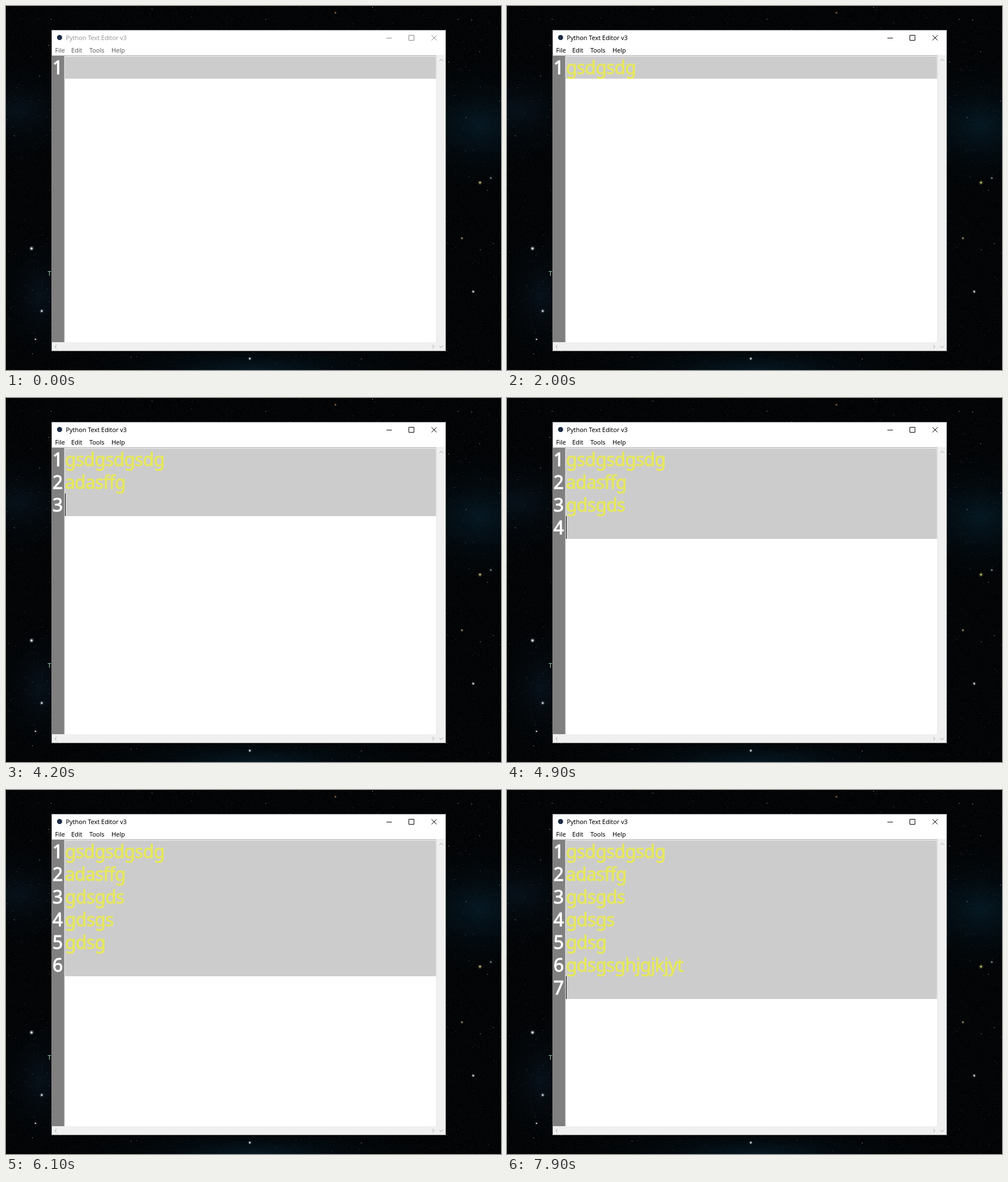
Recreate the animation shown at these times as an HTML page. Size 873 by 641 pixels, loop 8000 ms.

```html
<!DOCTYPE html>
<html lang="en">
<head>
<meta charset="utf-8">
<title>Text editor</title>
<style>
  html, body { margin: 0; width: 100%; height: 100%; overflow: hidden; background: #020406; }
  svg { display: block; width: 100%; height: 100%; }
  text { white-space: pre; font-family: "Noto Sans", "Open Sans", sans-serif; }
  .ui text { font-size: 11px; letter-spacing: -.08px; }
  .code text {
    font-size: 32px; letter-spacing: -.85px; stroke-width: 1;
    font-kerning: none; font-variant-ligatures: none;
  }
  .line { fill: none; stroke-width: 1; }
</style>
</head>
<body>
<svg viewBox="0 0 873 641" xmlns="http://www.w3.org/2000/svg">
  <defs>
    <radialGradient id="teal"><stop offset="0" stop-color="#051823"/><stop offset="1" stop-color="#020406" stop-opacity="0"/></radialGradient>
    <radialGradient id="blue"><stop offset="0" stop-color="#07111a"/><stop offset="1" stop-color="#020406" stop-opacity="0"/></radialGradient>
  </defs>

  <rect width="873" height="641" fill="#020406"/>
  <ellipse cx="835" cy="210" rx="170" ry="120" fill="url(#teal)"/>
  <ellipse cx="20" cy="185" rx="150" ry="95" fill="url(#blue)"/>
  <ellipse cx="60" cy="510" rx="80" ry="120" fill="url(#blue)"/>
  <ellipse cx="440" cy="640" rx="330" ry="50" fill="url(#teal)"/>
  <g id="sky"></g>
  <text x="73.5" y="474.5" font-size="11" fill="#a4d8b0">T</text>

  <!-- window -->
  <rect x="80.5" y="42.5" width="695" height="565" fill="#fff" stroke="#777"/>
  <circle cx="94.5" cy="55.5" r="4.5" fill="#1c2d45"/>
  <g class="ui" id="labels">
    <text x="105.5" y="60">Python Text Editor v3</text>
    <g id="menu">
      <text x="86.5" y="82">File</text>
      <text x="115" y="82">Edit</text>
      <text x="147" y="82">Tools</text>
      <text x="186" y="82">Help</text>
    </g>
  </g>
  <path id="controls" class="line" d="M671 56.5h9.5M710.5 51.5h9v9h-9zM750.5 51.5l9 9M759.5 51.5l-9 9"/>

  <!-- scroll bars -->
  <path d="M760 86h15v521H81v-15h679z" fill="#f0f0f0"/>
  <path class="line" stroke="#a2a2a2" stroke-width="1.3" d="M764.3 96.7l3.2-3.2 3.2 3.2M764.3 598.5l3.2 3.2 3.2-3.2M89.3 596.8l-3.2 3.2 3.2 3.2M751.6 596.8l3.2 3.2-3.2 3.2"/>

  <!-- text area -->
  <rect x="81" y="87" width="21" height="505" fill="#808080"/>
  <path class="line" stroke="#a0a0a0" d="M81 87.5h678M102.5 87v505"/>
  <path class="line" stroke="#e3e3e3" d="M103.5 88v504M759.5 87v505"/>
  <rect id="band" x="104" y="89" width="654.5" fill="#ccc"/>
  <g class="code" id="numbers" fill="#fff" stroke="#fff"></g>
  <g class="code" id="rows" fill="#e6e75f" stroke="#e6e75f"></g>
  <rect id="caret" height="40"/>
</svg>

<script>
const LOOP = 8000, TICK = 100, FOCUS = 1300;
const LEFT = 104, TOP = 88, ROW = 40;
const BLINK = 820, BLINK_ON = 520;

// [start in ms, text, ticks the typing takes]; an empty text only redraws the caret
const bursts = [
  [FOCUS, ""], [1600, "gsdgsdgsdg", 7], [2700, ""], [3000, "\n"],
  [3300, "ad"], [3500, "asf", 2], [3800, "fg"], [4200, "\n"],
  [4400, "gds", 3], [4800, "gds"], [4900, "\n"],
  [5200, "gds"], [5400, "gs\n", 3],
  [5800, "gds"], [6000, "g\n", 2],
  [6300, "gds"], [6500, "gsghjgj", 8], [7400, "kjyt"], [7700, "\n"], [7900, ""]
];

const $ = id => document.getElementById(id);

function set(el, attrs) {
  for (const name in attrs) el.setAttribute(name, attrs[name]);
}

function add(parent, tag, attrs) {
  const el = document.createElementNS("http://www.w3.org/2000/svg", tag);
  set(el, attrs);
  return parent.appendChild(el);
}

function drawSky() {
  let seed = 7;
  const random = () => (seed = seed * 16807 % 2147483647) / 2147483647;
  const dust = (count, fill, opacity) => {
    let d = "";
    for (let i = 0; i < count; i++) {
      d += `M${Math.floor(random() * 873)} ${Math.floor(random() * 641)}h1v1h-1z`;
    }
    add($("sky"), "path", { d, fill, opacity });
  };
  dust(14000, "#46535c", .2);
  dust(2500, "#63727c", .25);
  dust(250, "#93a2ac", .5);
  dust(60, "#dde6ea", .9);

  const star = (x, y, r, fill = "#e4eef2") => {
    add($("sky"), "circle", { cx: x, cy: y, r: r * 2.2, fill, opacity: .18 });
    add($("sky"), "circle", { cx: x, cy: y, r, fill });
  };
  star(45, 427, 2);
  star(63, 537, 1.6);
  star(52, 587, 1.1);
  star(824, 503, 1.4);
  star(430, 621, 1.4);
  star(836, 311, 1.8, "#c2bd70");
  star(855, 303, 1.2, "#7fa3ab");
  star(804, 409, 1.2, "#bba987");
  star(581, 12, 1.1, "#b98259");
}

// Text typed so far and the time of the latest redraw.
function typedAt(time) {
  let text = "", redraw = 0;
  for (const [start, part, ticks = 1] of bursts) {
    if (time < start) break;
    const tick = Math.min(ticks - 1, Math.floor((time - start) / TICK));
    text += part.slice(0, Math.round(part.length * (tick + 1) / ticks));
    redraw = start + tick * TICK;
  }
  return { lines: text.split("\n"), redraw };
}

const rows = typedAt(LOOP).lines.map((_, i) => {
  const y = TOP + 31.5 + i * ROW;
  const number = add($("numbers"), "text", { x: 82, y });
  number.textContent = i + 1;
  return { number, text: add($("rows"), "text", { x: LEFT, y }) };
});

function render(time) {
  const { lines, redraw } = typedAt(time);
  const active = time >= FOCUS;
  const last = lines.length - 1;

  rows.forEach(({ number, text }, i) => {
    number.style.display = i <= last ? "" : "none";
    text.textContent = lines[i] || "";
  });
  $("band").setAttribute("height", lines.length * ROW - 1);

  const width = lines[last] ? rows[last].text.getComputedTextLength() : 0;
  const caretOn = active && (redraw - FOCUS) % BLINK < BLINK_ON;
  set($("caret"), {
    x: width ? Math.round(LEFT + width) - 1 : LEFT,
    y: TOP + last * ROW,
    width: width ? 2 : 1,
    visibility: caretOn ? "visible" : "hidden"
  });

  $("labels").setAttribute("fill", active ? "#000" : "#999");
  $("menu").setAttribute("fill", active ? "#000" : "#606060");
  $("controls").setAttribute("stroke", active ? "#000" : "#888");
}

function tick() {
  render(performance.now() % LOOP);
  requestAnimationFrame(tick);
}

drawSky();
tick();
</script>
</body>
</html>
```
